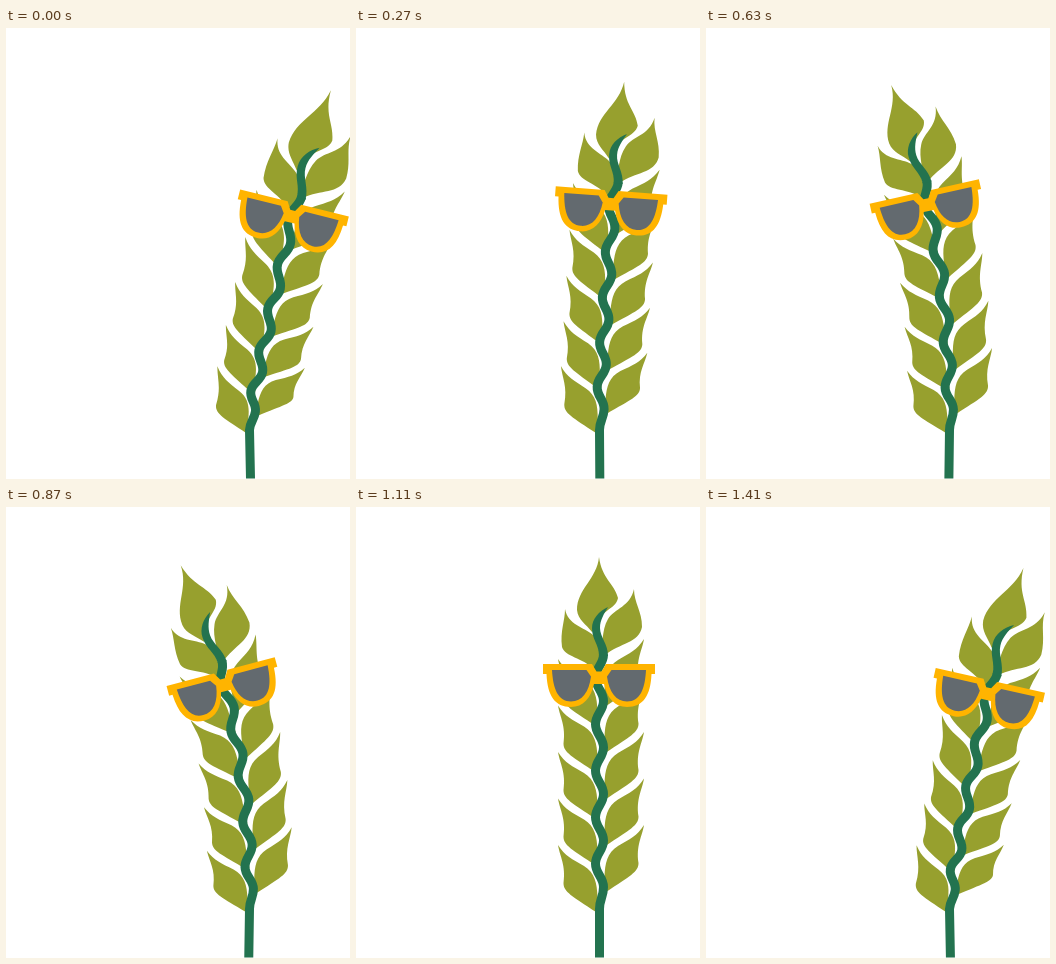
These frames come from a looping animation (344 by 451 pixels, 1.44 s). An HTML page:

```html
<!DOCTYPE html>
<html lang="en">
<head>
<meta charset="utf-8">
<title>Swaying wheat</title>
<style>
  html, body { margin: 0; width: 100%; height: 100%; overflow: hidden; background: #fff; }
  svg { display: block; }
</style>
</head>
<body>
<svg width="344" height="451" viewBox="0 0 344 451">
  <path id="leaves" fill="#97a02e"/>
  <path id="stem" fill="none" stroke="#23734f" stroke-width="9"/>
  <path id="curl" fill="#23734f"/>
  <g id="glasses">
    <path fill="#ffb400" d="M-56 0H-7L-2.5 7.5H2.5L7 0H56V10H52.5C51.5 32 44 43 28 43C16 43 8 34 5 20H-5C-8 34 -16 43 -28 43C-44 43 -51.5 32 -52.5 10H-56Z"/>
    <path id="lens" fill="#636a6f" d="M-47 6H-12.5L-8 12.5C-10 28 -17 37.5 -28 37.5C-41 37.5 -46 25 -47 6Z"/>
    <use href="#lens" transform="scale(-1 1)"/>
  </g>
</svg>
<script>
const LOOP = 1440, STEP = 30, AXIS = 243.5, ROOT = 402, GAP = 46.5;
const el = id => document.getElementById(id);
const mapPoints = (path, fn) =>
  path.replace(/(-?[\d.]+) (-?[\d.]+)/g, (_, x, y) => fn(+x, +y).map(v => v.toFixed(2)).join(' '));

// One side leaf, relative to its tip
const LEAF = 'M0 0C-2 12 -8 20 -5.5 38C-5.5 47 -14 51 -38 67L-42 66L-39.5 52C-39 38 -37 28 -26 21C-14 14 -7 11 0 0Z';
let leafPath =
  'M243 50C241 72 221 82 221 103C222 113 230 117 236 125L241 121C242 103 260 103 262 91C258 76 246 72 243 50Z' +
  'M278 82C278 96 286 104 286 120C283 136 264 136 249 148L243 146C248 138 245 124 252 112C259 101 274 100 278 82Z' +
  'M209 102C209 114 204 124 206 140C209 150 226 150 239 163L245 160C243 148 244 136 237 128C228 120 212 118 209 102Z';
for (let i = 0; i < 5; i++) {
  leafPath += mapPoints(LEAF, (x, y) => [288 + x, 318 - i * GAP + y]);
  leafPath += mapPoints(LEAF, (x, y) => [202 - x, 338 - i * GAP + y]);
}

let stemPath = 'M243.5 450.5L243.5 402C243.5 392 247.5 390 247.5 380';
for (let i = 0, x = 247.5, y = 380; i < 10; i++) {
  const nextX = 487 - x, nextY = y - GAP / 2;
  stemPath += `C${x} ${y - 10} ${nextX} ${nextY + 10} ${nextX} ${nextY}`;
  x = nextX;
  y = nextY;
}
const CURL = 'M252 149C252 137 244 130 244 121C244 113 248 107 252 100C243 104 236 112 236 121C236 133 243 137 243 149Z';

// Bend of the plant at full lean: sideways shift, drop and tilt by height
const bendRight = h => [
  .16 * h * h / (h + 20) + .00015 * h * h + 10 * (h / 352) ** 8,
  21 * Math.sin(Math.PI * h / 440),
  (.2 + .00025 * h) * Math.min(1, h / 60)
];
const bendLeft = h => [-94 * (h / 352) ** 2.4, 14.3 * h / (h + 100), -.0007 * h - 2.5e-6 * h * h];

function warp(lean) {
  const bend = lean > 0 ? bendRight : bendLeft, amount = Math.abs(lean);
  return (x, y) => {
    if (y > ROOT) return [x + lean * (y - ROOT) / 48, y];
    const [dx, dy, tilt] = bend(ROOT - y), u = x - AXIS;
    return [x + amount * (dx - u * tilt * tilt / 2), y + amount * (dy + u * tilt)];
  };
}

const TIMES = [0, 390, 780, 1110, 1440];
function track(t, values) {
  const i = TIMES.findIndex(end => t < end) - 1;
  const p = (t - TIMES[i]) / (TIMES[i + 1] - TIMES[i]);
  return values[i] + (values[i + 1] - values[i]) * p;
}

function draw(now) {
  const t = Math.floor(now % LOOP / STEP) * STEP;
  const bend = warp(track(t, [1, 0, -1, 0, 1]));
  el('leaves').setAttribute('d', mapPoints(leafPath, bend));
  el('stem').setAttribute('d', mapPoints(stemPath, bend));
  el('curl').setAttribute('d', mapPoints(CURL, bend));
  const x = track(t, [288.5, 241, 204, 243, 288.5]);
  const y = track(t, [175, 157, 167.5, 157, 175]);
  const angle = track(t, [14, 0, -20.6, 0, 14]);
  el('glasses').setAttribute('transform', `translate(${x} ${y}) rotate(${angle})`);
}

const start = performance.now();
(function tick() {
  draw(performance.now() - start);
  requestAnimationFrame(tick);
})();
</script>
</body>
</html>
```
